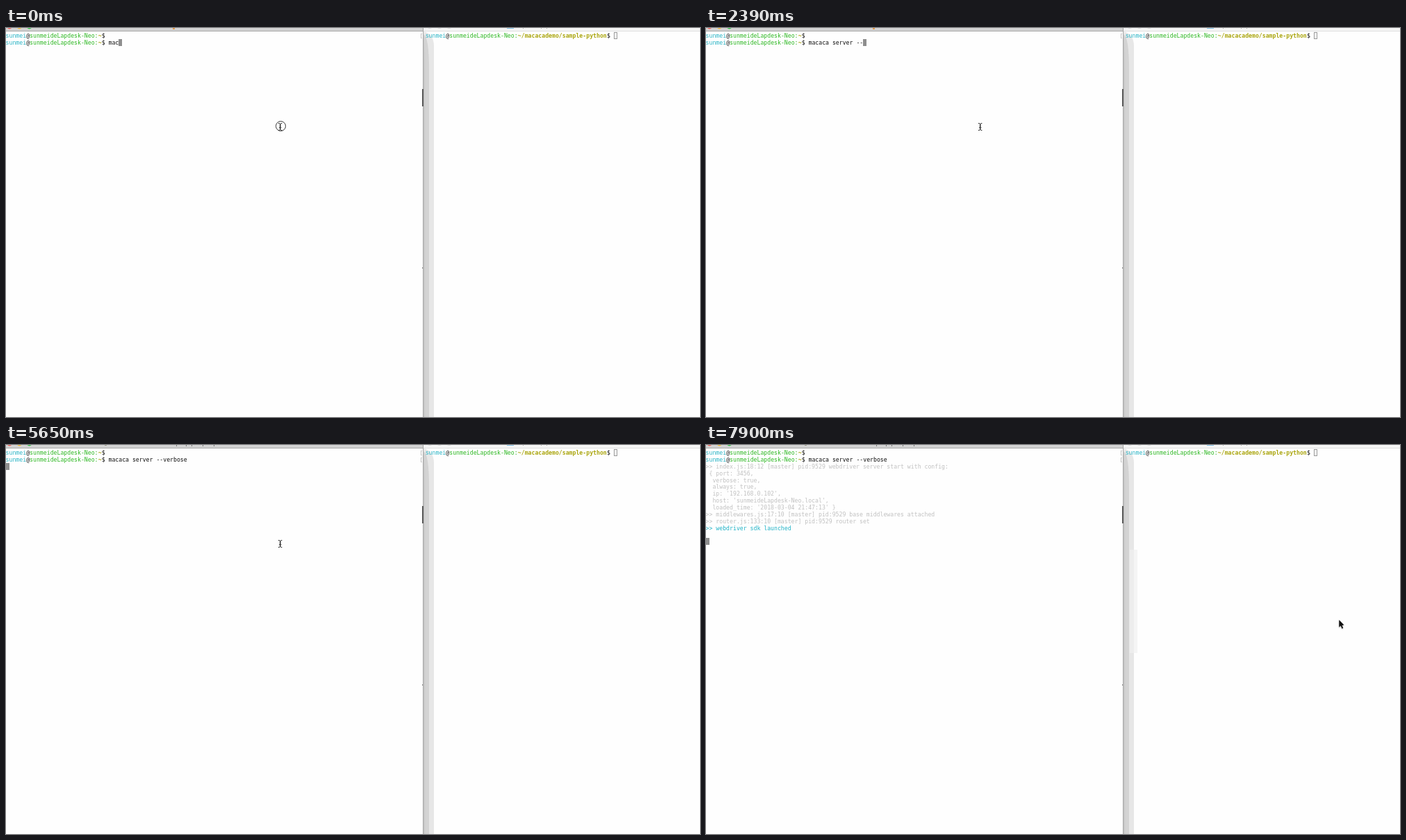
An HTML page with a canvas for the animation above (8 s loop, 999x561 px).

```html
<!DOCTYPE html>
<html lang="en">
<head>
<meta charset="utf-8">
<title>Terminal session</title>
<style>
html, body { margin: 0; width: 100%; height: 100%; overflow: hidden; background: #fefefe; }
canvas { display: block; width: 999px; height: 561px; }
</style>
</head>
<body>
<canvas id="stage" width="999" height="561"></canvas>
<script>
const ctx = document.getElementById('stage').getContext('2d');
const LOOP = 8000;
const CHAR = 4.93, LINE = 9.86, TOP = 6.4;
const FONT = '8.19px "DejaVu Sans Mono", monospace';
const CYAN = '#2cb5c6', GREEN = '#2fb824', YELLOW = '#aaa50c';
const BLACK = '#111', GREY = '#c1c1c1', BLOCK = '#8e8e8e';

const USER = 'sunmei', HOST = 'sunmeideLapdesk-Neo';
const COMMAND = 'macaca server --verbose';
const PROMPT_LENGTH = USER.length + HOST.length + 5;

// [time, number of typed characters]
const TYPING = [
  [0, 3], [150, 4], [300, 5], [480, 6], [920, 7], [1220, 8], [1360, 10],
  [1660, 11], [1800, 13], [1950, 14], [2240, 15], [2390, 16],
  [2680, 17], [2830, 18], [2970, 19], [3120, 20], [3570, 19],
  [3860, 20], [4160, 21], [4310, 22], [4460, 23]
];
const ENTER = 4750, RETITLE = 5650, OUTPUT = 5950, NEWLINE = 7150, MOVE = 7450;
const POINTER = [[MOVE, 690, 226], [7600, 929, 285], [7900, 911, 252]];

const LOG = [
  '>> index.js:18:12 [master] pid:9529 webdriver server start with config:',
  ' { port: 3456,',
  '  verbose: true,',
  '  always: true,',
  "  ip: '192.168.0.102',",
  `  host: '${HOST}.local',`,
  "  loaded_time: '2018-03-04 21:47:13' }",
  '>> middlewares.js:17:10 [master] pid:9529 base middlewares attached',
  '>> router.js:133:10 [master] pid:9529 router set'
];

const latest = (steps, t) => steps.filter(s => s[0] <= t).pop();

function rect(x, y, w, h, color) {
  ctx.fillStyle = color;
  ctx.fillRect(x, y, w, h);
}

function dot(x, y, r, color) {
  ctx.fillStyle = color;
  ctx.beginPath();
  ctx.arc(x, y, r, 0, Math.PI * 2);
  ctx.fill();
}

function text(str, x, row, color, bold) {
  ctx.font = (bold ? 'bold ' : '') + FONT;
  ctx.fillStyle = color;
  ctx.fillText(str, x, TOP + row * LINE + 7.7);
}

function prompt(x, row, path) {
  const runs = [[USER, CYAN], ['@', BLACK], [HOST + ':', GREEN], [path, YELLOW, true], ['$', BLACK]];
  for (const [str, color, bold] of runs) {
    text(str, x, row, color, bold);
    x += str.length * CHAR;
  }
}

function block(col, row) {
  rect(Math.round(col * CHAR - 0.5), Math.round(TOP + row * LINE - 0.2), 5, 10, BLOCK);
}

function shadowBand(right, top, bend, color) {
  ctx.fillStyle = color;
  ctx.beginPath();
  ctx.moveTo(601, top);
  ctx.quadraticCurveTo(right, top + 4, right, bend);
  ctx.lineTo(right, 561);
  ctx.lineTo(601, 561);
  ctx.fill();
}

function rightWindow(t) {
  shadowBand(616, 5, 26, '#e7e7e7');
  shadowBand(609, 9, 60, '#d3d3d3');
  shadowBand(603, 12, 70, '#c8c8c8');
  if (t >= MOVE) {
    rect(610, 151, 6, 149, '#ededed');
    rect(616, 151, 5, 149, '#f5f5f5');
  }
  rect(601, 0, 398, 4, '#f6f6f6');
  rect(601, 4, 398, 1, '#dedede');
  for (const x of [610, 624, 638]) dot(x, -3, 4, '#dcdcdc');
  rect(721, 0, 10, 1, '#82c3ea');
  for (const x of [744, 770, 778]) rect(x, 0, 1, 1, '#aaa');
  prompt(603.7, 0, '~/macacademo/sample-python');
  ctx.strokeStyle = '#999';
  ctx.lineWidth = 1;
  ctx.strokeRect(875.5, 6.5, 4, 9);
}

function leftTitle(t) {
  rect(0, 0, 600, 4, '#d3d3d3');
  rect(0, 4, 600, 1, '#a9a9a9');
  ['#f35f57', '#f5bd30', '#33c748'].forEach((c, i) => dot(5 + i * 14.3, -3, 4.4, c));
  if (t < RETITLE) {
    rect(240, 0, 3, 2, '#e29a4c');
  } else {
    rect(142, 0, 3, 1, '#9b9b8b');
    for (const x of [245, 259, 267, 283, 299]) rect(x, 0, 1, 2, '#777');
  }
}

function lineMark(row) {
  const y = Math.round(TOP + row * LINE) + 2;
  rect(597, y, 1, 7, '#c2c2c2');
  rect(598, y, 1, 1, '#d2d2d2');
  rect(598, y + 6, 1, 1, '#d2d2d2');
}

function leftWindow(t) {
  leftTitle(t);
  rect(600, 0, 1, 561, '#a4a4a4');
  rect(599, 88, 2, 25, '#555');
  rect(599, 345, 1, 2, '#999');
  lineMark(0);
  if (t >= ENTER) lineMark(1);

  prompt(-0.4, 0, '~');
  prompt(-0.4, 1, '~');
  const typed = latest(TYPING, t)[1];
  text(COMMAND.slice(0, typed), PROMPT_LENGTH * CHAR - 0.4, 1, BLACK);

  if (t < ENTER) {
    block(PROMPT_LENGTH + typed, 1);
  } else if (t < OUTPUT) {
    block(0, 2);
  } else {
    LOG.forEach((str, i) => text(str, -0.4, i + 2, GREY));
    text('>> webdriver sdk launched', -0.4, 11, '#20b3c7');
    block(0, t < NEWLINE ? 12 : 13);
  }
}

function textCursor(ring) {
  if (ring) {
    ctx.strokeStyle = '#333';
    ctx.lineWidth = 1;
    ctx.beginPath();
    ctx.arc(395.5, 141.5, 7, 0, Math.PI * 2);
    ctx.stroke();
  }
  rect(394, 138, 1.4, 9, '#222');
  for (const y of [137, 147]) {
    rect(392, y, 2, 1, '#333');
    rect(395.4, y, 2, 1, '#333');
  }
  rect(393, 143, 3.4, 1, '#444');
}

function arrow(x, y) {
  ctx.save();
  ctx.translate(x, y);
  ctx.beginPath();
  ctx.moveTo(0.3, 0.3);
  for (const [px, py] of [[0.3, 10.8], [2.7, 8.6], [4.4, 12.7], [6.2, 11.9], [4.5, 7.9], [7.4, 7.6]]) {
    ctx.lineTo(px, py);
  }
  ctx.closePath();
  ctx.shadowColor = 'rgba(0,0,0,.3)';
  ctx.shadowBlur = 2;
  ctx.shadowOffsetY = 1;
  ctx.fillStyle = '#111';
  ctx.fill();
  ctx.restore();
}

function draw(now) {
  const t = now % LOOP;
  rect(0, 0, 999, 561, '#fefefe');
  rightWindow(t);
  leftWindow(t);
  if (t < MOVE) {
    textCursor(t < 150);
  } else {
    const [, x, y] = latest(POINTER, t);
    arrow(x, y);
  }
}

const start = performance.now();
function tick() {
  draw(performance.now() - start);
  requestAnimationFrame(tick);
}
tick();
</script>
</body>
</html>
```
